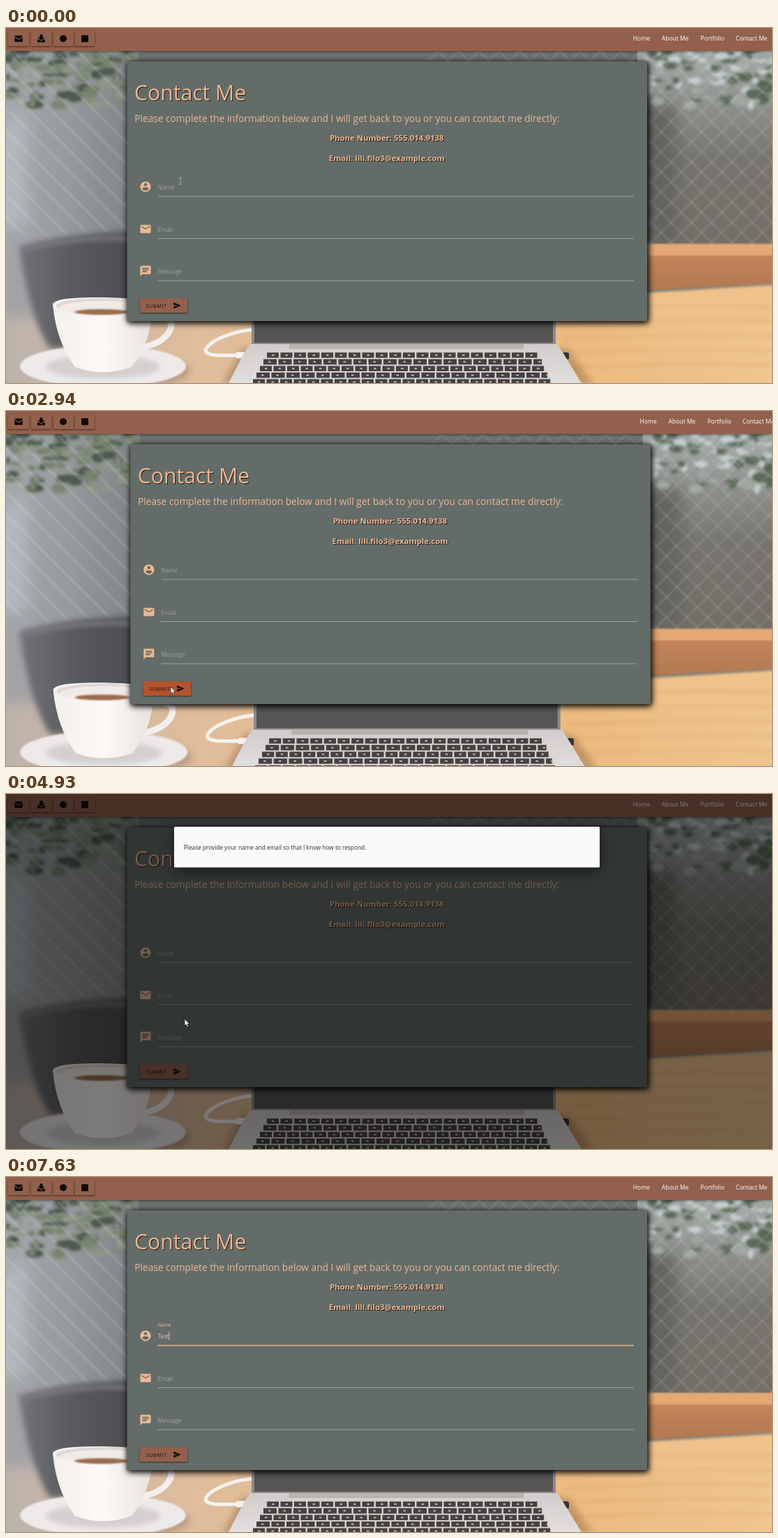
An HTML page with a canvas that plays this animation: 1098x510 px, repeating every 8000 ms.

```html
<!DOCTYPE html>
<html lang="en">
<head>
<meta charset="utf-8">
<title>Contact Me</title>
<style>
html, body { margin: 0; width: 100%; height: 100%; overflow: hidden; background: #777; }
main { position: absolute; inset: 0; overflow: clip; contain: paint; }
canvas, svg { position: absolute; left: 0; top: 0; width: 1098px; height: 510px; overflow: hidden; }
text { font-family: "Open Sans", "Noto Sans", sans-serif; font-size: 8.4px; white-space: pre; }
.peach { fill: #ebb793; }
.shade { filter: drop-shadow(1px 1px 0 #241a15); }
.label { fill: #9c9f9e; }
.nav { font-size: 8.55px; fill: #fff; }
.raised { filter: drop-shadow(0 1px 1.2px rgba(0,0,0,.55)); }
.rule { stroke: #9b9f9d; }
</style>
</head>
<body>
<main>
<canvas id="photo" width="1098" height="510"></canvas>
<svg viewBox="0 0 1098 510">
  <g>
    <rect x="-5" y="-5" width="1108" height="38" fill="#92604c" style="filter:drop-shadow(0 1px 2px rgba(0,0,0,.5))"/>
    <g class="raised" fill="#93604c">
      <rect x="3" y="5" width="30" height="21" rx="1"/>
      <rect x="36" y="5" width="29.5" height="21" rx="1"/>
      <rect x="68" y="5" width="29" height="21" rx="1"/>
      <rect x="98.5" y="5" width="28.5" height="21" rx="1"/>
    </g>
    <g fill="#100b09">
      <path d="M12.3 11.7q0-1 1-1h9.6q1 0 1 1l-5.8 4.2zM12.3 13v6q0 1 1 1h9.6q1 0 1-1v-6l-5.8 4.2z"/>
      <path d="M48.5 9.5h4v4h3l-5 4.5-5-4.5h3zM45 16.5h2.5l3 2.7 3-2.7h2.5v4h-11z"/>
      <circle cx="82" cy="15.3" r="5"/>
      <rect x="108" y="10.3" width="10" height="10"/>
    </g>
    <g id="links">
      <text class="nav" x="898.8" y="17.5">Home</text>
      <text class="nav" x="939.8" y="17.5">About Me</text>
      <text class="nav" x="995.6" y="17.5">Portfolio</text>
      <text class="nav" x="1046" y="17.5">Contact Me</text>
    </g>
  </g>
  <g id="card">
    <rect x="173.5" y="48" width="745.5" height="373" rx="1" fill="#636c69" style="filter:drop-shadow(1px 2px 5px rgba(0,0,0,.95)) drop-shadow(1px 1px 2px rgba(0,0,0,.5))"/>
    <text class="peach" x="184" y="104" style="font-size:30.2px;filter:drop-shadow(1.4px 1.4px 0 #241a15)">Contact Me</text>
    <text class="peach" x="184.3" y="135" style="font-size:13.69px">Please complete the information below and I will get back to you or you can contact me directly:</text>
    <g class="peach shade" font-weight="700" text-anchor="middle">
      <text x="545.7" y="161.7" style="font-size:11.4px">Phone Number: 555.014.9138</text>
      <text x="545.7" y="191" style="font-size:11.4px">Email: lili.filo3@example.com</text>
    </g>
    <g class="peach" fill-rule="evenodd">
      <path transform="translate(190.9 219)scale(.76)" d="M12 2C6.48 2 2 6.48 2 12s4.48 10 10 10 10-4.48 10-10S17.52 2 12 2zm0 3c1.66 0 3 1.34 3 3s-1.34 3-3 3-3-1.34-3-3 1.34-3 3-3zm0 14.2c-2.5 0-4.71-1.28-6-3.22.03-1.99 4-3.08 6-3.08 1.99 0 5.97 1.09 6 3.08-1.29 1.94-3.5 3.22-6 3.22z"/>
      <path transform="translate(190.9 279.6)scale(.76)" d="M20 4H4c-1.1 0-2 .9-2 2v12c0 1.1.9 2 2 2h16c1.1 0 2-.9 2-2V6c0-1.1-.9-2-2-2zm0 4l-8 5-8-5V6l8 5 8-5v2z"/>
      <path transform="translate(190.9 340)scale(.76)" d="M20 2H4c-1.1 0-2 .9-2 2v18l4-4h14c1.1 0 2-.9 2-2V4c0-1.1-.9-2-2-2zM6 9h12v2H6V9zm8 5H6v-2h8v2zm4-6H6V6h12v2z"/>
    </g>
    <path id="nameRule" class="rule" d="M217.5 242H900"/>
    <path class="rule" d="M217.5 302.5H900M217.5 363H900"/>
    <text id="nameLabel" class="label">Name</text>
    <text class="label" x="217.5" y="292.7">Email</text>
    <text class="label" x="217.5" y="353.2">Message</text>
    <text id="typed" x="217.7" y="232" fill="#ecccb6"></text>
    <path id="caret" stroke="#ecd3c2" stroke-width=".9" d="M0 222.5v12"/>
    <rect id="button" class="raised" x="191.5" y="388.3" width="68.8" height="20.8" rx="1"/>
    <text x="200.4" y="401.8" fill="#1b1310" style="font-size:7.3px;letter-spacing:.6px">SUBMIT</text>
    <path transform="translate(239.3 392.7)scale(.5)" fill="#100b09" d="M2 21L23 12 2 3v7l15 2-15 2z"/>
  </g>
  <rect id="overlay" width="1098" height="510"/>
  <g id="modal">
    <rect id="sheet" y="47" height="58.5" rx="1.5" fill="#fafafa" style="filter:drop-shadow(0 6px 9px rgba(0,0,0,.5))"/>
    <text id="notice" y="79.8" fill="#2b2b2b" style="font-size:8.29px">Please provide your name and email so that I know how to respond.</text>
  </g>
  <path id="arrow" fill="#fff" stroke="#111" stroke-width=".7" d="M0 0V10L2.2 8 3.8 11.6 5.5 10.8 4 7.4H7z"/>
  <path id="beam" fill="none" stroke="#adb2b0" stroke-width=".9" d="M-2.2-5Q0-5 0-3.8Q0-5 2.2-5M0-4V4M-2.2 5Q0 5 0 3.8Q0 5 2.2 5"/>
</svg>
</main>
<script>
const $ = id => document.getElementById(id);
const c = $('photo').getContext('2d');

function fill(color, d, blur = 0) {
  c.filter = blur ? `blur(${blur}px)` : 'none';
  c.fillStyle = color;
  c.fill(new Path2D(d));
}
function line(color, width, d, dash = [], blur = 0) {
  c.filter = blur ? `blur(${blur}px)` : 'none';
  c.strokeStyle = color;
  c.lineWidth = width;
  c.setLineDash(dash);
  c.stroke(new Path2D(d));
}
function oval(color, x, y, rx, ry, blur = 0) {
  fill(color, `M${x - rx} ${y}a${rx} ${ry} 0 1 0 ${2 * rx} 0a${rx} ${ry} 0 1 0 ${-2 * rx} 0`, blur);
}
function ramp(x0, y0, x1, y1, ...colors) {
  const g = c.createLinearGradient(x0, y0, x1, y1);
  colors.forEach((color, i) => g.addColorStop(i / (colors.length - 1), color));
  return g;
}
let seed = 7;
const rnd = () => (seed = seed * 16807 % 2147483647) / 2147483647;

function garden() {
  fill('#6e7271', 'M-10 0H1110V520H-10z');
  fill(ramp(0, 0, 180, 0, '#a3a7ab', '#96999d', '#818487'), 'M-20 0H190V520H-20z');
  fill(ramp(0, 60, 0, 310, '#9da29f', '#77756f', '#736d67'), 'M905 0H1120V320H905z');
  fill('#62645d', 'M900 110H960V310H900z', 12);
  fill('#b3b8bc', 'M-20 150L30 110V290H-20z', 12);
  const tones = ['#5a6958', '#78856f', '#a0a8a2', '#4d5a50', '#c6cfd3', '#8d9688'];
  for (let i = 0; i < 260; i++) {
    const x = i % 2 ? rnd() * 180 : 910 + rnd() * 195;
    oval(tones[i % 6], x, 32 + rnd() ** 1.3 * 82, 3 + rnd() * 9, 2 + rnd() * 5, 2);
  }
  for (let x = -300; x < 180; x += 31)
    line('rgba(225,228,230,.2)', 3, `M${x} 33l330 330`, [], 1.2);
  for (let x = 620; x < 1420; x += 29)
    line('rgba(225,225,225,.15)', 2.5, `M${x} 33l290 290M${x} 33l-290 290`, [], 1);
}

function table() {
  fill(ramp(0, 0, 1098, 0, '#bcb2ac', '#e0bd9b', '#e6b98c', '#ecbb80', '#f0c590'), 'M-10 384H1110V520H-10z', 2);
  fill('#e3a873', 'M900 310H1110V330H900z', 1);
  fill(ramp(0, 326, 0, 384, '#c4855a', '#b07750'), 'M900 327H1110V366L900 378z', 1);
  fill('#efc28b', 'M900 381L1110 368V425H900z', 2);
  for (let y = 405; y < 510; y += 21)
    line('rgba(196,134,78,.15)', 4, `M800 ${y}Q960 ${y - 9} 1110 ${y - 4}`, [], 2);
  fill('#a3a3a6', 'M-10 300H190V415H-10z', 8);
  fill(ramp(20, 0, 180, 0, '#707276', '#57595d', '#4b4d50'), 'M19 314Q90 294 190 292V460H62Q32 410 19 314z', 4);
  line('#7d7f83', 5, 'M23 320Q95 299 185 303', [], 3);
}

function cup() {
  oval('rgba(120,92,74,.35)', 154, 493, 110, 25, 5);
  oval('#eeeaea', 139, 486, 119, 30, 1);
  oval('#d5d0d0', 139, 487, 82, 17, 3);
  line('#f4efec', 9, 'M194 419Q243 408 236 432Q227 456 181 461', [], .6);
  fill(ramp(67, 0, 211, 0, '#f3efed', '#fcf9f7', '#e9e2df'), 'M67 397Q69 386 138 387Q208 388 210 399Q209 451 180 487Q139 502 99 487Q72 451 67 397z', .6);
  oval('#e0d8d4', 138, 399, 66, 11, .6);
  oval('#f1ebe8', 138, 402, 61, 10, .6);
  oval('#9a6c4e', 137, 408, 39, 4, .8);
}

function laptop() {
  fill('rgba(120,80,50,.35)', 'M338 460H805L842 512H310z', 5);
  line('#f6f1ee', 5, 'M370 434C330 430 285 452 286 464C290 474 325 469 350 470', [], .5);
  line('#f6f1ee', 9, 'M330 470H352');
  fill('#343334', 'M794 466h10q3 0 3 3v7h-13z', .5);
  fill('#8d8b8a', 'M352 415H788V456H352z');
  fill('#565554', 'M356 415H784V452H356z');
  fill(ramp(0, 453, 0, 512, '#d0cccc', '#e3dfde'), 'M350 454H790L798 466 826 512H318L342 466z');
  fill('#b9b3b0', 'M406 454H742V461H406z');
  fill('#d6cfcb', 'M374 465H764L784 512H354z');
  for (let i = 0; i < 5; i++) {
    const y = 470 + i * 9.6, left = 374 - i * 5, right = 764 + i * 4;
    line('#454142', 7.6, `M${left} ${y}H${right}`, [17 + i % 2 * 2, 2.5], .4);
    line('#bdb8b5', 2, `M${left + 7} ${y}H${right}`, [3.5, 16 + i % 2 * 2], .3);
  }
}

// Pointer moves: start, end, steps, x, y
const moves = [
  [430, 510, 2, 235, 221.5], [890, 890, 1, 234, 225.5], [1130, 1540, 6, 196, 315.5],
  [1720, 2180, 6, 228, 388], [2360, 2440, 2, 236, 396], [4140, 4140, 1, 235.5, 395.5],
  [4290, 4690, 6, 258.5, 314.5], [4840, 4840, 1, 256, 323],
  [5290, 5540, 4, 408, 38], [5630, 5880, 4, 219, 228]
];
const stepped = (t, start, end, n) =>
  t < start ? 0 : Math.min(1, (Math.floor((t - start) / ((end - start) / (n - 1) || 1)) + 1) / n);

function pointer(t) {
  let x = 250, y = 220;
  for (const [start, end, n, toX, toY] of moves) {
    const p = stepped(t, start, end, n);
    x += (toX - x) * p;
    y += (toY - y) * p;
  }
  return [x, y];
}
const set = (id, attrs) => {
  for (const k in attrs) $(id).setAttribute(k, attrs[k]);
};
const show = (id, on) => set(id, { visibility: on ? 'visible' : 'hidden' });

let zoom;
function drawPhoto(scale) {
  if (scale === zoom) return;
  zoom = scale;
  seed = 7;
  c.setTransform(scale, 0, 0, scale, 0, 0);
  garden();
  table();
  cup();
  laptop();
}

function draw(t) {
  const wide = t >= 2940 && t < 4930;
  const open = t >= 3060 && t < 5120;
  const closing = t >= 5030;
  drawPhoto(wide ? 1.0085 : 1);
  set('card', { transform: `translate(${wide ? 4.8 : 0} 0)` });
  set('links', { transform: `translate(${wide ? 9.8 : 0} 0)` });
  set('button', { fill: t >= 2180 && t < 3060 ? '#b5532b' : '#92604c' });

  show('overlay', open);
  show('modal', open);
  set('overlay', { opacity: closing ? .06 : .5 });
  set('modal', {
    opacity: closing ? .11 : 1,
    transform: closing ? 'translate(546 24.5)scale(.82)translate(-546 -47)' : ''
  });
  set('sheet', { x: wide ? 243.3 : 241, width: wide ? 614.7 : 610 });
  set('notice', { x: wide ? 257 : 254.8 });

  const p = 1 - (1 - stepped(t, 6040, 6370, 4)) ** 2;
  set('nameLabel', {
    transform: `translate(217.5 ${232.2 - 16.9 * p})scale(${1 - .2 * p})`,
    style: p > .5 ? 'fill:#ebb793' : ''
  });
  set('nameRule', { style: p > .5 ? 'stroke:#ebb793;stroke-width:1.7' : '' });

  const count = [7180, 7320, 7470, 7630].filter(k => t >= k).length;
  $('typed').textContent = 'Test'.slice(0, count);
  show('caret', t >= 7180 || t >= 6040 && t < 6600);
  set('caret', { transform: `translate(${218.5 + [0, 4.3, 8.6, 12.5, 15.4][count]} 0)` });

  const text = t < 1130 || t >= 5880;
  const place = { transform: `translate(${pointer(t)})` };
  set('arrow', place);
  set('beam', place);
  show('arrow', !text);
  show('beam', text && t < 6040);
}

function tick() {
  draw(performance.now() % 8000);
  requestAnimationFrame(tick);
}
tick();
</script>
</body>
</html>
```
